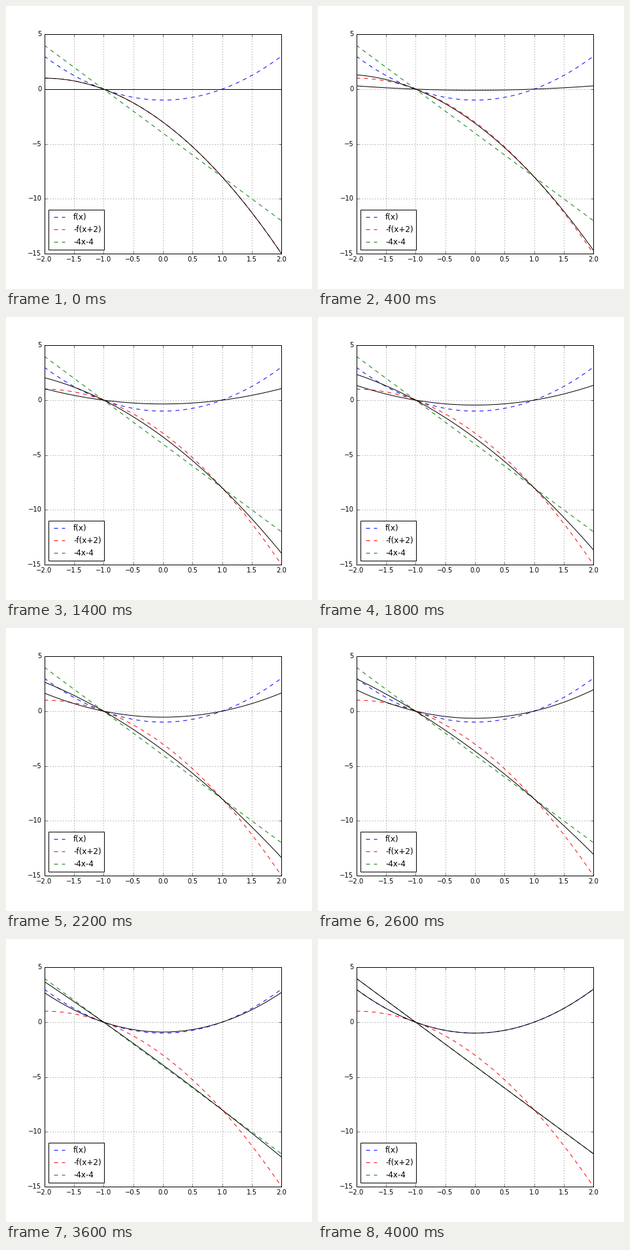
These frames come from a looping animation (468x432 px, 4200 ms). A matplotlib script:

```python
import numpy as np
import matplotlib.pyplot as plt
from matplotlib.animation import FuncAnimation

STEPS = 21
DPI = 72

plt.style.use("classic")
plt.rcParams.update({
    "font.family": "DejaVu Sans",
    "font.size": 10,
    "figure.dpi": DPI,
    "savefig.dpi": DPI,
    "figure.facecolor": "white",
    "savefig.facecolor": "white",
})


def f(x):
    return x**2 - 1


x = np.linspace(-2, 2, 100)
start = -f(x + 2)

fig, ax = plt.subplots(figsize=(468 / DPI, 432 / DPI), dpi=DPI)
fig.subplots_adjust(left=0.125, right=0.9, bottom=0.125, top=0.9)

ax.plot(x, f(x), "b--", label="f(x)")
ax.plot(x, start, "r--", label="-f(x+2)")
ax.plot(x, -4 * x - 4, "g--", label="-4x-4")
scaled, = ax.plot(x, 0 * x, "k-")
total, = ax.plot(x, start, "k-")

ax.set_xlim(-2, 2)
ax.set_ylim(-15, 5)
ax.set_yticks(range(-15, 6, 5))
ax.grid(True)
ax.legend(loc="lower left")


def update(step):
    """Blend a growing share of f(x) into -f(x+2)."""
    part = step / (STEPS - 1) * f(x)
    scaled.set_ydata(part)
    total.set_ydata(start + part)
    return scaled, total


anim = FuncAnimation(fig, update, frames=STEPS, interval=200,
                     repeat=True, repeat_delay=0)
plt.show()
```
